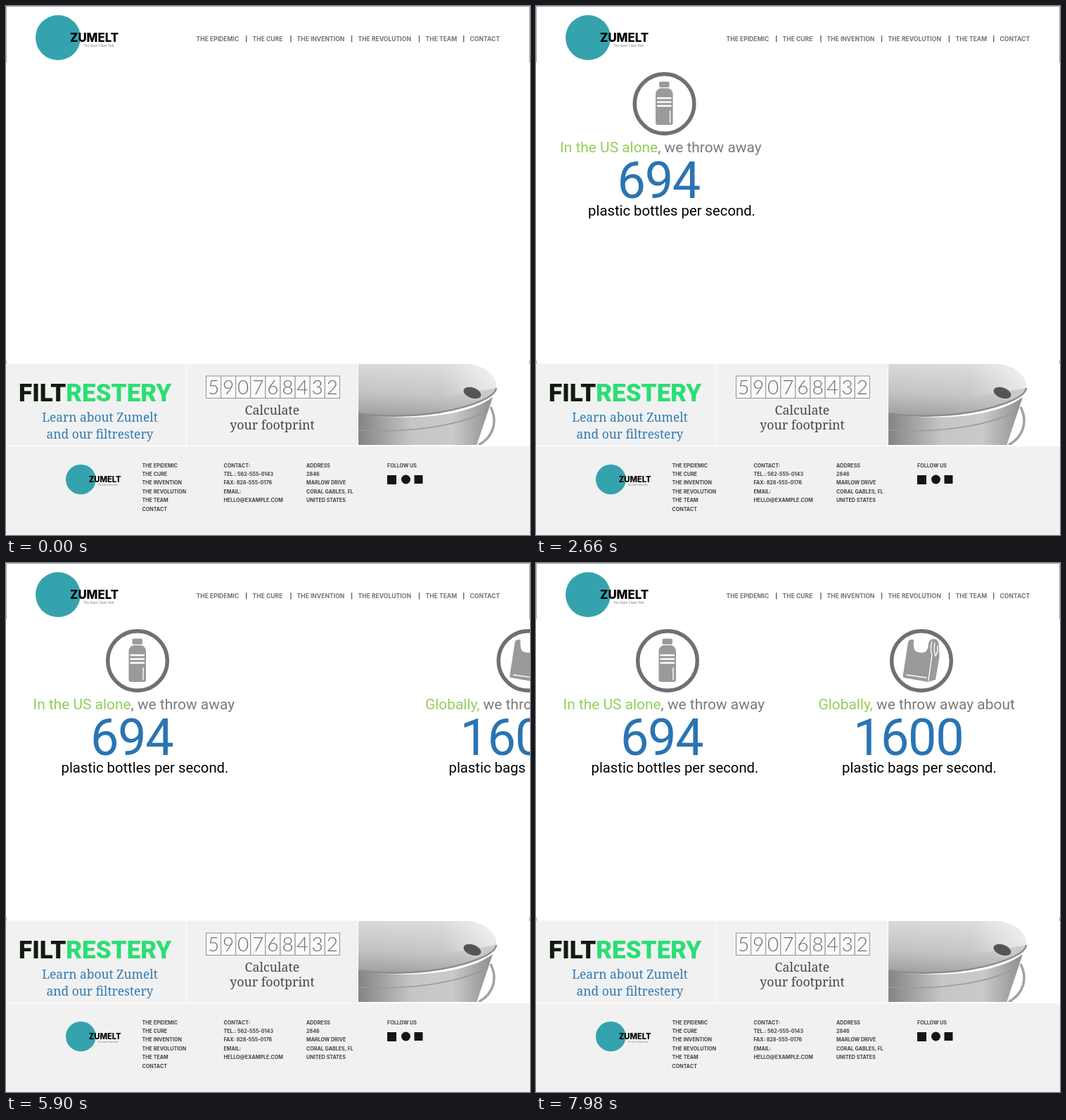
An HTML page for the animation above (8000 ms loop, 745x752 px).

```html
<!DOCTYPE html>
<html lang="en">
<head>
<meta charset="utf-8">
<style>
  html, body { margin: 0; width: 100%; height: 100%; overflow: hidden; background: #fff; }
  svg { position: absolute; left: 0; top: 0; width: 745px; height: 752px; }
  text { white-space: pre; }
  .menu { font: 700 8.6px Inter, sans-serif; fill: #747474; }
  .foot { font: 700 7.15px Inter, sans-serif; fill: #444; }
  .slab { font: 17.8px "Noto Serif", serif; text-anchor: middle; fill: #484848; }
  .learn { font-size: 17.4px; font-weight: 300; fill: #3079b4; }
  .digit { font: 300 28px Lato, sans-serif; text-anchor: middle; fill: #6a6a6a; }
  .line { font: 20.9px Roboto, sans-serif; fill: #7a7a7a; }
  .place { fill: #92cf58; }
  .count { font: 72px Roboto, sans-serif; letter-spacing: -1.4px; fill: #2a74b3; }
  .unit { font: 20.3px Roboto, sans-serif; fill: #000; }
  .ring { fill: none; stroke: #726f70; stroke-width: 5.4; }
  .icon { fill: #9a9a9a; }
  .cut { fill: none; stroke: #fff; stroke-linecap: round; }
</style>
</head>
<body>
<svg viewBox="0 0 745 752">
  <defs>
    <linearGradient id="lid" x1=".3" y1="1" x2=".5" y2="0">
      <stop offset="0" stop-color="#a2a2a2"/>
      <stop offset=".4" stop-color="#c4c4c4"/>
      <stop offset="1" stop-color="#dcdcdc"/>
    </linearGradient>
    <linearGradient id="shine">
      <stop offset=".6" stop-color="#fff" stop-opacity="0"/>
      <stop offset="1" stop-color="#fff" stop-opacity=".6"/>
    </linearGradient>
    <linearGradient id="body">
      <stop offset="0" stop-color="#848484"/>
      <stop offset=".4" stop-color="#c6c6c6"/>
      <stop offset=".7" stop-color="#cacaca"/>
      <stop offset="1" stop-color="#8e8e8e"/>
    </linearGradient>
    <clipPath id="photo"><path d="M501 509H745V624H501Z"/></clipPath>
    <g id="brand">
      <circle cx="74" cy="45" r="32" fill="#35a3ad"/>
      <text x="91" y="50.5" style="font:800 16.8px Inter,sans-serif">ZUMELT</text>
      <text x="110" y="58" style="font:4.4px Inter,sans-serif" fill="#777">The Quiet Clean Hub</text>
    </g>
  </defs>

  <!-- page frame and header -->
  <path d="M.5 80V.5H744.5V80M.5 504V509M744.5 504V509" fill="none" stroke="#a4a4a4"/>
  <use href="#brand"/>
  <path d="M341.7 42V51.5M405 42V51.5M491.5 42V51.5M587.5 42V51.5M650.7 42V51.5" stroke="#666" stroke-width="1.4"/>
  <g id="menu"></g>

  <!-- moving facts -->
  <g id="bottles">
    <circle class="ring" cx="187" cy="139" r="42.3"/>
    <rect class="icon" x="179.5" y="107.5" width="14.5" height="8.3" rx="2"/>
    <path class="icon" d="M181 117H192.5Q199 119 199 126V166Q199 169 196 169H177.5Q174.5 169 174.5 166V126Q174.5 119 181 117Z"/>
    <path class="cut" stroke-width="2.4" d="M177.5 131H196M177.5 136.5H196M177.5 142H196"/>
    <path class="cut" stroke-width="1.4" d="M195 149V166"/>
    <text class="line" x="38.5" y="207.5"><tspan class="place">In the US alone</tspan>, we throw away</text>
    <text class="count" x="120" y="272.5">694</text>
    <text class="unit" x="78.5" y="298.3">plastic bottles per second.</text>
  </g>
  <g id="bags">
    <circle class="ring" cx="548" cy="139" r="42.3"/>
    <path class="icon" d="M529 113Q530 108 537 109Q536 124 541 126Q549 129 554 126Q558 122 558 114Q560 107 567 108Q572 109 573 117L573.5 134L568 166L557 169L523 163Q521 162 522 158Z"/>
    <path class="cut" stroke-width="1.4" d="M563 112Q560 122 563 130L558 167M567 114Q565 124 568 132Q572 126 571 118M527 159L555 163"/>
    <text class="line" x="401.5" y="207.5"><tspan class="place">Globally,</tspan> we throw away about</text>
    <text class="count" x="451" y="272.5">1600</text>
    <text class="unit" x="435" y="298.3">plastic bags per second.</text>
  </g>

  <!-- three panels -->
  <path d="M0 508.5H256V625H0ZM257 508.5H500V625H257ZM0 626H745V752H0Z" fill="#f1f1f1"/>
  <text x="18" y="562.3" style="font:900 35px Roboto,sans-serif" fill="#101c10">FILT<tspan fill="#2bde73">RESTERY</tspan></text>
  <text class="slab learn" x="133.5" y="590.5">Learn about Zumelt</text>
  <text class="slab learn" x="133.5" y="615">and our filtrestery</text>
  <g id="counter"></g>
  <text class="slab" x="378.5" y="581">Calculate</text>
  <text class="slab" x="378.5" y="601.5">your footprint</text>

  <g clip-path="url(#photo)">
    <path d="M689 570C699 590 694 612 672 624" fill="none" stroke="#a2a2a2" stroke-width="3.5"/>
    <path d="M501 580C590 592 660 580 692 556L668 628H501Z" fill="url(#body)"/>
    <path d="M501 603C570 607 640 598 684 576" fill="none" stroke="#9a9a9a" stroke-width="1.5"/>
    <g id="top">
      <path id="disc" d="M501 509H655C682 511 698 527 697 543C696 558 650 574 600 580C560 584 525 583 501 579Z" fill="url(#lid)"/>
      <use href="#disc"/>
      <path d="M501 509H655C682 511 698 527 697 543L600 560Z" fill="url(#shine)"/>
    </g>
    <path d="M501 579C525 583 560 584 600 580C650 574 696 558 697 543" fill="none" stroke="#8b8b8b" stroke-width="2.5"/>
    <ellipse cx="663" cy="550" rx="13.5" ry="8" transform="rotate(20 663 550)" fill="#555" stroke="#ddd"/>
  </g>

  <!-- footer -->
  <use href="#brand" transform="translate(57 643) scale(.667)"/>
  <g id="foot"></g>
  <path d="M542 667H555V680H542ZM580.5 667H592.5V679H580.5Z" fill="#151515"/>
  <circle cx="568.5" cy="673" r="6.5" fill="#151515"/>
</svg>
<script>
const $ = id => document.getElementById(id);

function add(parent, tag, attrs, content = '') {
  const el = document.createElementNS('http://www.w3.org/2000/svg', tag);
  for (const k in attrs) el.setAttribute(k, attrs[k]);
  el.textContent = content;
  $(parent).append(el);
}

const pages = ['THE EPIDEMIC', 'THE CURE', 'THE INVENTION', 'THE REVOLUTION', 'THE TEAM', 'CONTACT'];
const menuX = [270.5, 350.5, 413.5, 500.5, 596.5, 659.5];
pages.forEach((p, i) => add('menu', 'text', { class: 'menu', x: menuX[i], y: 50.2 }, p));

const columns = [
  [193.5, pages],
  [309.5, ['CONTACT:', 'TEL.: 562-555-0143', 'FAX: 828-555-0176', 'EMAIL:', 'HELLO@EXAMPLE.COM']],
  [427, ['ADDRESS', '2846', 'MARLOW DRIVE', 'CORAL GABLES, FL', 'UNITED STATES']],
  [542, ['FOLLOW US']]
];
for (const [x, rows] of columns)
  rows.forEach((r, i) => add('foot', 'text', { class: 'foot', x, y: 655.6 + 12.4 * i }, r));

[...'590768432'].forEach((d, i) => {
  const x = 284.5 + 21.1 * i;
  add('counter', 'rect', { x, y: 526, width: 21.1, height: 31.5, fill: '#fafafa', stroke: '#929292' });
  add('counter', 'text', { class: 'digit', x: x + 10.5, y: 551.8 }, d);
});

// Steady slide towards 0, then a damped swing; t is ms since arrival.
const slide = t => t < 0 ? .2255 * t : 36.3 * Math.sin(.0055 * t) * Math.exp(-.0024 * t);

function draw(now) {
  const t = now % 8000;
  $('bottles').setAttribute('transform', `translate(${slide(t - 1960)})`);
  $('bags').setAttribute('transform', `translate(${.8 - slide(t - 6760)})`);
  requestAnimationFrame(draw);
}
draw(performance.now());
</script>
</body>
</html>
```
